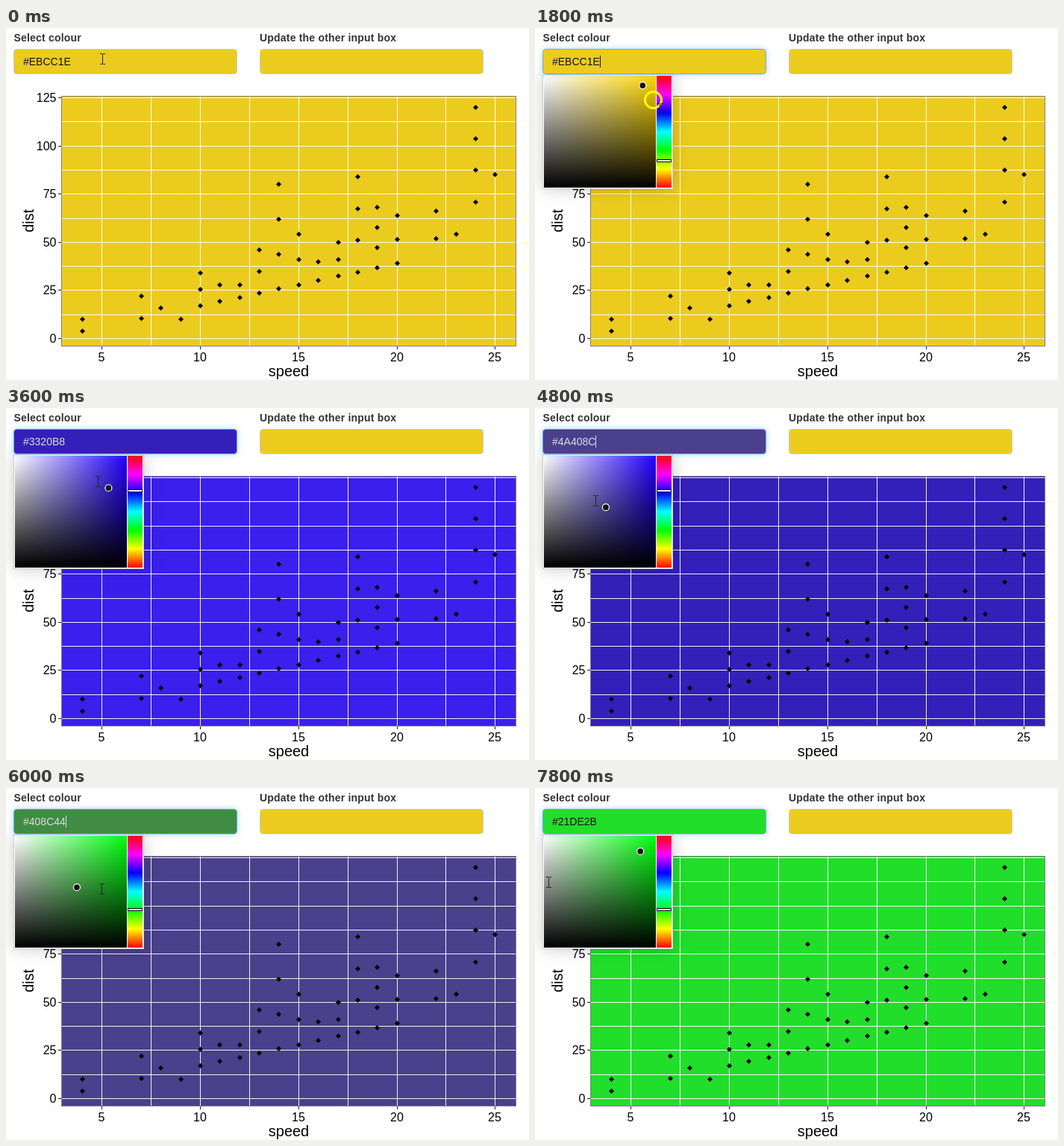
Write an HTML page with a canvas that moves like this. It is 701 px wide and 472 px high and loops after 8 s.

```html
<!DOCTYPE html>
<html lang="en">
<head>
<meta charset="utf-8">
<style>
html, body { margin: 0; width: 701px; height: 472px; overflow: hidden; background: #fff; }
canvas { display: block; }
</style>
</head>
<body>
<canvas id="stage" width="701" height="472"></canvas>
<script>
const ctx = document.getElementById('stage').getContext('2d');
const LOOP = 8000, STEP = 200, PLOT_DELAY = 400, MOVE = 600, OPEN_AT = 800;
const FONT = '"Liberation Sans", Arial, sans-serif';

const mix = (a, b, k) => a + (b - a) * k;
const rgb = hex => [1, 3, 5].map(i => parseInt(hex.slice(i, i + 2), 16));

// Colour, with its hue slider and dot position in the picker
function swatch(time, hex) {
  const [r, g, b] = rgb(hex), max = Math.max(r, g, b), range = max - Math.min(r, g, b);
  const turn = max === r ? (g - b) / range : max === g ? 2 + (b - r) / range : 4 + (r - g) / range;
  const hue = (turn * 60 + 360) % 360;
  return {
    time, hex, hue,
    ink: 0.299 * r + 0.587 * g + 0.114 * b < 128 ? '#ddd' : '#111',
    sliderY: 64 + 150 * (1 - hue / 360),
    dotX: 13.5 + 150 * range / max,
    dotY: 65.5 + 150 * (1 - max / 255)
  };
}

const picks = [
  swatch(0, '#EBCC1E'), swatch(2000, '#3A1FED'), swatch(3600, '#3320B8'),
  swatch(4600, '#4A408C'), swatch(5800, '#408C44'), swatch(6800, '#21DE2B')
];

// The pointer clicks the hue slider or the shade square one step before each pick
const clicks = picks.slice(1).map((pick, i) => {
  const onSlider = Math.abs(pick.hue - picks[i].hue) > 5;
  return {
    time: pick.time - STEP,
    x: onSlider ? 167 : pick.dotX - 14,
    y: onSlider ? pick.sliderY - 3 : pick.dotY - 9
  };
});
const stops = [{ time: 0, x: 129, y: 41 }, ...clicks,
  { time: 6000, x: 128, y: 135 }, { time: 7800, x: 18, y: 126 }].sort((a, b) => a.time - b.time);

function pointerAt(t) {
  const n = stops.findIndex(s => s.time >= t);
  if (n < 1) return stops.at(n);
  const a = stops[n - 1], b = stops[n];
  const start = Math.max(a.time, b.time - MOVE);
  const k = 1 - (1 - Math.max(0, t - start) / (b.time - start)) ** 1.5;
  return { x: Math.round(mix(a.x, b.x, k)), y: Math.round(mix(a.y, b.y, k)) };
}

// Highest dot at each speed from 4 up; the rest of a column is spaced evenly down to a trend
const tops = [10, 0, 0, 22, 16, 10, 34, 28, 28, 46, 80, 54, 40, 50, 84, 68, 64, 0, 66, 54, 120, 85];
const dots = tops.flatMap((top, i) => {
  if (!top) return [];
  const speed = i + 4;
  const low = Math.min(top, Math.max(2.2 * speed - 5, 9.5 * speed - 157));
  const gaps = Math.min(3, Math.round((top - low) / 11));
  return Array.from({ length: gaps + 1 }, (_, k) => [speed, mix(top, low, k / (gaps || 1))]);
});

const plotX = v => Math.round(128.3 + (v - 5) * 26.35);
const plotY = v => Math.round(415.9 - v * 2.582);

function rect(color, x, y, w, h) {
  ctx.fillStyle = color;
  ctx.fillRect(x, y, w, h);
}

function label(text, x, y, font, color = '#000', align = 'left') {
  ctx.font = `${font} ${FONT}`;
  ctx.fillStyle = color;
  ctx.textAlign = align;
  ctx.fillText(text, x, y);
}

function circle(x, y, r, fill, stroke, width) {
  ctx.beginPath();
  ctx.arc(x, y, r, 0, Math.PI * 2);
  ctx.fillStyle = fill;
  ctx.fill();
  ctx.strokeStyle = stroke;
  ctx.lineWidth = width;
  ctx.stroke();
}

function diamond(x, y, r) {
  ctx.beginPath();
  ctx.moveTo(x - r, y);
  ctx.lineTo(x, y - r);
  ctx.lineTo(x + r, y);
  ctx.lineTo(x, y + r);
  ctx.fillStyle = '#000';
  ctx.fill();
}

function gradient(x, y, w, h, vertical, colors) {
  const g = vertical ? ctx.createLinearGradient(0, y, 0, y + h) : ctx.createLinearGradient(x, 0, x + w, 0);
  colors.forEach((c, i) => g.addColorStop(i / (colors.length - 1), c));
  rect(g, x, y, w, h);
}

function withShadow(color, blur, paint) {
  ctx.save();
  ctx.shadowColor = color;
  ctx.shadowBlur = blur;
  paint();
  ctx.restore();
}

function drawPlot(color) {
  const line = 'rgba(255,255,255,.92)';
  rect(color, 75, 92, 608, 334);
  for (let v = 5; v <= 25; v += 2.5) rect(line, plotX(v), 92, 1, 334);
  for (let v = 0; v <= 125; v += 12.5) rect(line, 75, plotY(v), 608, 1);
  for (const [speed, dist] of dots) diamond(plotX(speed) + 0.5, plotY(dist) + 0.5, 3.5);
  ctx.strokeStyle = '#7f7f7f';
  ctx.lineWidth = 1;
  ctx.strokeRect(74.5, 91.5, 609, 335);
  for (let v = 5; v <= 25; v += 5) {
    rect('#222', plotX(v), 427, 1, 4);
    label(v, plotX(v), 447, '16px', '#000', 'center');
  }
  for (let v = 0; v <= 125; v += 25) {
    rect('#222', 70, plotY(v), 4, 1);
    label(v, 67.5, plotY(v) + 6, '16px', '#000', 'right');
  }
  label('speed', 379, 467, '20px', '#000', 'center');
  ctx.save();
  ctx.translate(37, 258.5);
  ctx.rotate(-Math.PI / 2);
  label('dist', 0, 0, '20px', '#000', 'center');
  ctx.restore();
}

function drawInput(x, color, focused) {
  ctx.beginPath();
  ctx.roundRect(x + 0.5, 28.5, 299, 33, 4);
  ctx.fillStyle = color;
  withShadow(focused ? 'rgba(102,175,233,.6)' : 'transparent', 8, () => ctx.fill());
  ctx.strokeStyle = focused ? '#66afe9' : '#ccc';
  ctx.lineWidth = 1;
  ctx.stroke();
}

function drawPicker(pick, next, progress) {
  const at = key => mix(pick[key], next[key], progress);
  withShadow('rgba(0,0,0,.2)', 20, () => rect('#ccc', 10, 62, 175, 154));
  rect('#fff', 11, 63, 173, 152);
  rect(`hsl(${pick.hue} 100% 50%)`, 12, 64, 150, 150);
  gradient(12, 64, 150, 150, false, ['#fff', 'rgba(255,255,255,0)']);
  gradient(12, 64, 150, 150, true, ['rgba(0,0,0,0)', '#000']);
  gradient(163, 64, 20, 150, true, ['#f00', '#f0f', '#00f', '#0ff', '#0f0', '#ff0', '#f00']);
  const y = Math.round(at('sliderY'));
  rect('#000', 163, y - 2, 20, 4);
  rect('#fff', 164, y - 1, 18, 2);
  circle(at('dotX'), at('dotY'), 4.5, '#151515', '#fff', 1.2);
}

function drawPointer(x, y) {
  rect('#222', x, y - 6, 1, 13);
  for (const end of [y - 7, y + 7]) {
    rect('#222', x - 3, end, 3, 1);
    rect('#222', x + 1, end, 3, 1);
  }
}

function draw(t) {
  const pick = picks.findLast(p => p.time <= t);
  const next = picks.find(p => p.time > t) || pick;
  const plotted = picks.findLast(p => p.time + PLOT_DELAY <= t) || picks[0];
  const clicking = next.time - t === STEP;
  const open = t >= OPEN_AT;
  const { x, y } = pointerAt(t);

  rect('#fff', 0, 0, 701, 472);
  ctx.letterSpacing = '0.2px';
  label('Select colour', 10.5, 18, 'bold 14px', '#333');
  label('Update the other input box', 340, 18, 'bold 14px', '#333');
  ctx.letterSpacing = '0px';
  drawPlot(plotted.hex);
  if (open) drawPicker(pick, next, clicking ? 0.18 : 0);
  drawInput(10, pick.hex, open);
  drawInput(340, picks[0].hex, false);
  label(pick.hex, 23, 50, '14px', pick.ink);
  if (open && t % 1060 >= 530) {
    rect(pick.ink, Math.round(23 + ctx.measureText(pick.hex).width), 37, 1, 16);
  }
  if (clicking) circle(x - 8.5, y - 11.5, 11, 'transparent', '#ff0', 3);
  drawPointer(x, y);
}

function tick() {
  const t = performance.now() % LOOP;
  draw(Math.floor(t / STEP) * STEP);
  requestAnimationFrame(tick);
}
tick();
</script>
</body>
</html>
```
